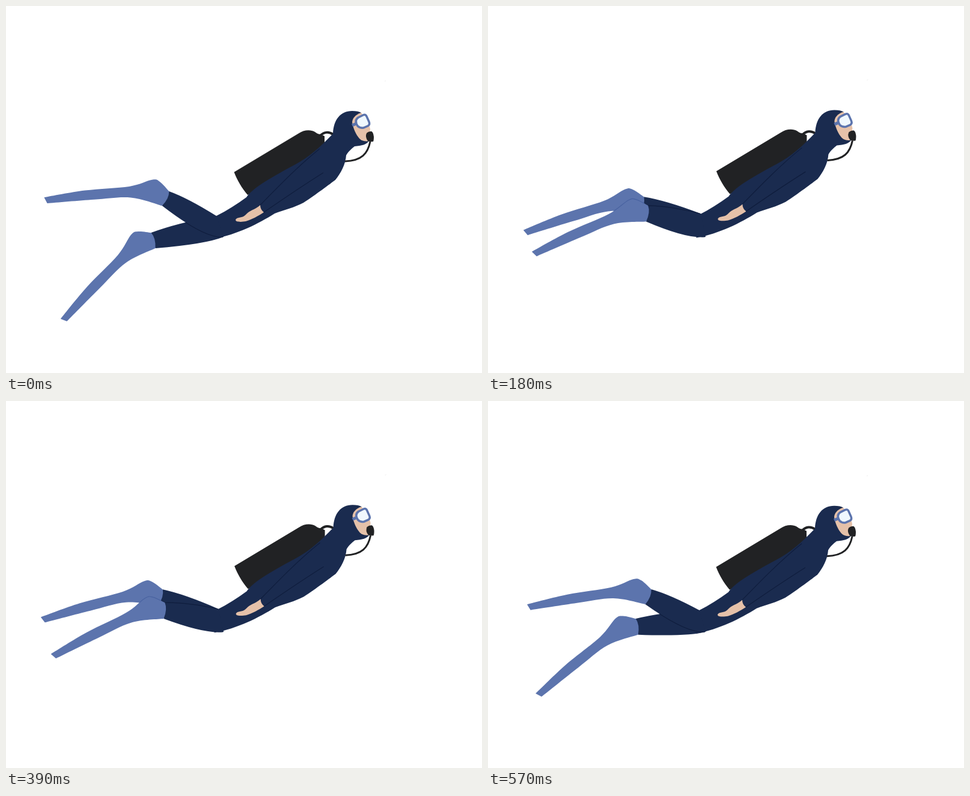
These frames come from a looping animation (792x612 px, 600 ms). An HTML page with a canvas:

```html
<!DOCTYPE html>
<html lang="en">
<head>
<meta charset="utf-8">
<title>Diver</title>
<style>
html, body { margin: 0; width: 100%; height: 100%; overflow: hidden; background: #fff; }
canvas { display: block; }
</style>
</head>
<body>
<canvas id="stage" width="792" height="612"></canvas>
<script>
const ctx = document.getElementById('stage').getContext('2d');
const SUIT = '#1a2b4f', SEAM = '#0f1d3d', FIN = '#5c74ad', FIN_EDGE = '#4862a0',
      BLACK = '#212224', SKIN = '#e5c1a9', LENS = '#f0f8fe';
const STEP = 30, HALF = 300, { PI, sin, cos } = Math;

// One rigid fin, as [distance from the ankle, height], ankle to tip and back.
const finTop = [[-6, 12], [9, 28], [22, 31.5], [60, 21], [134, 15.5], [202, 5]];
const finBottom = [[197, -5], [119, 0], [58, 2.5], [6, -12]];

const mix = (a, b, k) => a + (b - a) * k;

// Smooth curve through all points.
function spline(path, pts) {
  path.lineTo(...pts[0]);
  for (let i = 0; i < pts.length - 1; i++) {
    const p = pts[i], q = pts[i + 1];
    const before = pts[i - 1] || p, after = pts[i + 2] || q;
    path.bezierCurveTo(
      p[0] + (q[0] - before[0]) / 6, p[1] + (q[1] - before[1]) / 6,
      q[0] - (after[0] - p[0]) / 6, q[1] - (after[1] - p[1]) / 6, ...q);
  }
}

// The fin turns with its ankle; the thigh joins it to hip and seat.
function makeLeg([x, y], degrees, hip, seat) {
  const c = cos(degrees * PI / 180), s = sin(degrees * PI / 180);
  const place = ([d, h]) => [x - d * c - h * s, y + d * s - h * c];
  const top = finTop.map(place), bottom = finBottom.map(place);
  const a = top[0], b = bottom[bottom.length - 1];

  const fin = new Path2D();
  spline(fin, top);
  spline(fin, bottom);
  fin.quadraticCurveTo(...place([-6, 0]), ...a);
  fin.closePath();

  const thigh = new Path2D();
  thigh.moveTo(...seat);
  thigh.quadraticCurveTo(332, Math.max(389, 276 + 0.3 * b[1]), ...b);
  thigh.lineTo(...a);
  thigh.quadraticCurveTo(mix(a[0], hip[0], 0.4), mix(a[1], hip[1], 0.4) - 5, ...hip);
  return { fin, thigh };
}

function nearLeg(u, hip, seat) {
  const e = u ** 0.85;
  const x = mix(mix(265.5, 271, e), mix(271, 257.7, e), e);
  return makeLeg([x, mix(321, 359.8, e)], mix(0.9, 30, e), hip, seat);
}

function farLeg(u, hip, seat) {
  const e = 1 - (1 - u) ** 2.3;
  const angle = 41.7 - 41 * u - 5 * sin(PI * u) - 2 * sin(2 * PI * u);
  return makeLeg([mix(245, 258, e), mix(391, 323, e)], angle, hip, seat);
}

function fill(path, color) {
  ctx.fillStyle = color;
  ctx.fill(path);
}

function stroke(path, color, width) {
  ctx.strokeStyle = color;
  ctx.lineWidth = width;
  ctx.stroke(path);
}

function strokeInside(path, area, color) {
  ctx.save();
  ctx.clip(area);
  stroke(path, color, 1.2);
  ctx.restore();
}

function shifted(dx, dy, paint) {
  ctx.save();
  ctx.translate(dx, dy);
  paint();
  ctx.restore();
}

const shape = d => new Path2D(d);
const tank = shape('M379.5 277L486 213C496 206 507 206 514 210C518 213 521 214 524 214L530 217L530 235L440 300L402 315C392 303 385 291 379.5 277Z');
const valve = shape('M523 216C529 210 537 209 544 214');
const body = shape('M350 350C368 341 385 330 400 319C410 303 450 281 480 265C504 252 522 236 544 213C545 190 556 175 576 175C583 175 588 176 591 178L604 225C600 231 592 233 580 234C575 238 570 242 566 249C565 264 557 279 548 290C540 296 515 315 495 328C480 336 463 340 447 346C420 363 385 381 346 388Z');
const armLines = shape('M423 332C455 299 487 266 522 238M429 344C455 326 493 300 528 278');
const hand = shape('M423 332C417 338 408 340 402 345C399 348 397 350 395 351C390 353 382 353 382 357C383 361 394 360 399 359C409 356 420 350 429 344C425 341 423 337 423 332Z');
const face = shape('M591 178C581 181 576 188 576 194C578 205 582 214 588 221C593 226 599 226 604 225L606 205L603 194Z');
const strap = shape('M576 199L583 196');
const mask = shape('M586 186L594 182Q598 180 600 184L604 193Q606 198 602 200L595 203Q589 204 585 200Q579 191 586 186Z');
const regulator = shape('M600 212Q603 209 608 209Q611 210 612 218Q612 224 611 226Q606 227 602 225Q597 218 600 212Z');
const hose = shape('M606 226C602 246 592 258 564 259');
const speck = shape('M630 125.5L632 124.5');

function draw(time) {
  const now = Math.floor(time / STEP) * STEP % (2 * HALF);
  const u = 1 - Math.abs(1 - now / HALF);
  const lift = 4 * sin(PI * u);
  const dx = 1.2 * u * u, dy = -2 * sin(u * PI / 2);
  const hip = [350 + lift, 350 - lift], seat = [362, 385];
  const near = nearLeg(u, hip, seat), far = farLeg(u, hip, seat);

  ctx.fillStyle = '#fff';
  ctx.fillRect(0, 0, 792, 612);

  shifted(dx, dy, () => {
    fill(tank, BLACK);
    stroke(valve, BLACK, 4);
  });
  fill(far.thigh, SUIT);
  fill(far.fin, FIN);
  shifted(dx, dy, () => fill(body, SUIT));
  fill(near.thigh, SUIT);
  strokeInside(near.thigh, far.thigh, SEAM);
  fill(near.fin, FIN);
  strokeInside(near.fin, far.fin, FIN_EDGE);

  shifted(dx, dy, () => {
    stroke(armLines, SEAM, 1.2);
    fill(hand, SKIN);
    fill(face, SKIN);
    stroke(strap, FIN, 5);
    fill(mask, LENS);
    stroke(mask, FIN, 3.5);
    stroke(hose, BLACK, 3);
    fill(regulator, BLACK);
    stroke(speck, '#eee', 1);
  });
}

function tick() {
  draw(performance.now());
  requestAnimationFrame(tick);
}
tick();
</script>
</body>
</html>
```
